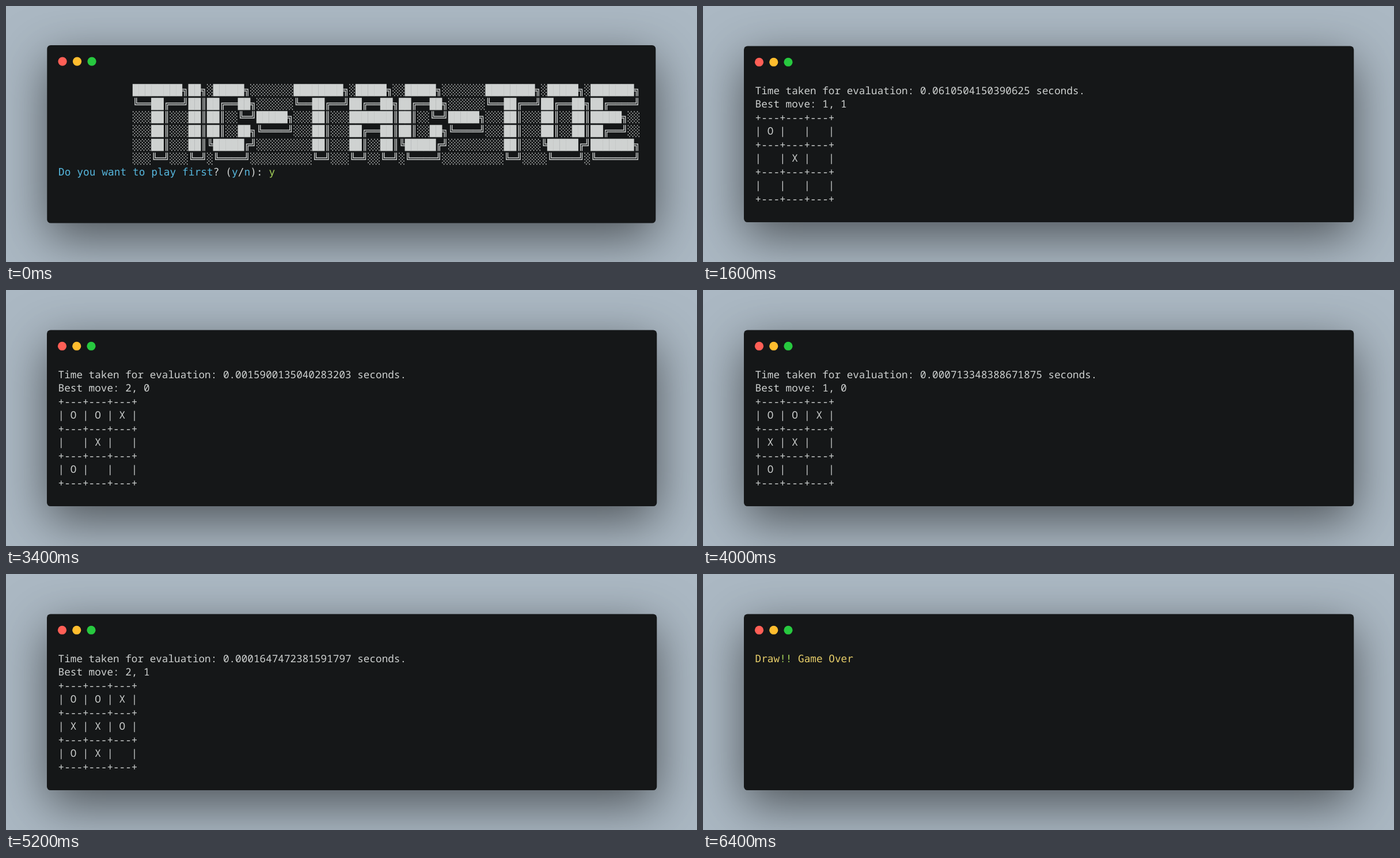
An HTML page for the animation above (7000 ms loop, 1200 by 444 pixels).

```html
<!DOCTYPE html>
<html lang="en">
<head>
<meta charset="utf-8">
<title>Tic-tac-toe in a terminal</title>
<style>
  html, body { margin: 0; width: 100%; height: 100%; overflow: hidden; background: #abb8c3; }
  #win {
    position: absolute; height: 241.5px; transform-origin: 0 0;
    background: #151718; border-radius: 5px; box-shadow: 0 20px 68px rgba(0, 0, 0, .55);
  }
  svg { position: absolute; left: 0; top: 0; width: 100%; height: 100%; }
  text {
    white-space: pre; text-rendering: geometricPrecision; fill: #cfd2d1;
    font: 14px "DejaVu Sans Mono", monospace; font-variant-ligatures: none;
  }
  .log text { font-family: "Noto Sans Mono", monospace; }
  .blue { fill: #55b5db; }
  .green { fill: #9fca56; }
  .yellow { fill: #e6cd69; }
</style>
</head>
<body>
<div id="win">
  <svg>
    <circle cx="21" cy="22" r="6" fill="#ff5f56"/>
    <circle cx="41" cy="22" r="6" fill="#ffbd2e"/>
    <circle cx="61" cy="22" r="6" fill="#27c93f"/>
    <g id="screen"></g>
  </svg>
</div>
<script>
const win = document.getElementById('win');
const screen = document.getElementById('screen');

// Rows of each banner letter
const letters = {
  T: '████████╗ ╚══██╔══╝ ░░░██║░░░ ░░░██║░░░ ░░░██║░░░ ░░░╚═╝░░░',
  I: '██╗ ██║ ██║ ██║ ██║ ╚═╝',
  C: '░█████╗░ ██╔══██╗ ██║░░╚═╝ ██║░░██╗ ╚█████╔╝ ░╚════╝░',
  A: '░█████╗░ ██╔══██╗ ███████║ ██╔══██║ ██║░░██║ ╚═╝░░╚═╝',
  O: '░█████╗░ ██╔══██╗ ██║░░██║ ██║░░██║ ╚█████╔╝ ░╚════╝░',
  E: '███████╗ ██╔════╝ █████╗░░ ██╔══╝░░ ███████╗ ╚══════╝',
  '-': '░░░░░░ ░░░░░░ █████╗ ╚════╝ ░░░░░░ ░░░░░░'
};

// Row, column and evaluation time of each move; O begins
const moves = [
  [0, 0, '0.41733551025390625'],
  [1, 1, '0.0610504150390625'],
  [0, 1, '0.020473718643188477'],
  [0, 2, '0.0064105987548828125'],
  [2, 0, '0.0015900135040283203'],
  [1, 0, '0.000713348388671875'],
  [1, 2, '0.00036716461181640625'],
  [2, 1, '0.0001647472381591797'],
  [2, 2, '8.392333984375e-05']
];

const paint = (color, s) => `<tspan class="${color}">${s}</tspan>`;

function banner() {
  const word = [...'TIC-TAC-TOE'].map(c => letters[c].split(' '));
  return word[0].map((_, row) => ' '.repeat(12) + word.map(l => l[row]).join(''));
}

function intro() {
  const prompt = paint('blue', 'Do you want to play first') + '? (' + paint('blue', 'y') +
    '/' + paint('blue', 'n') + '): ' + paint('green', 'y');
  return [...banner(), prompt];
}

function turn(count) {
  const cells = Array(9).fill(' ');
  moves.slice(0, count).forEach(([r, c], i) => cells[r * 3 + c] = 'OX'[i % 2]);
  const [row, col, time] = moves[count - 1];
  const rule = '+---+---+---+';
  const lines = [`Time taken for evaluation: ${time} seconds.`, `Best move: ${row}, ${col}`, rule];
  for (let r = 0; r < 9; r += 3) lines.push(`| ${cells.slice(r, r + 3).join(' | ')} |`, rule);
  return lines;
}

const ending = () => [paint('yellow', 'Draw') + paint('green', '!!') + paint('yellow', ' Game Over')];

function place(left, top, width, scale) {
  win.style.width = width + 'px';
  win.style.transform = `translate(${left}px, ${top}px) scale(${scale})`;
}

function show(step) {
  const last = moves.length + 1;
  if (step === 0) place(71.3, 68, 829.3, 1.275);
  else place(71, 69.5, 838.8, 1.2625);
  const lines = step === 0 ? intro() : step === last ? ending() : turn(step);
  screen.setAttribute('class', step > 0 && step < last ? 'log' : '');
  screen.innerHTML = lines
    .map((s, i) => `<text x="15.5" y="${65.9 + i * 18.62}">${s}</text>`).join('');
}

let shown = -1;
function tick() {
  const t = performance.now() % 7000;
  const step = t < 1000 ? 0 : 1 + Math.floor((t - 1000) / 600);
  if (step !== shown) show(shown = step);
  requestAnimationFrame(tick);
}
tick();
</script>
</body>
</html>
```
